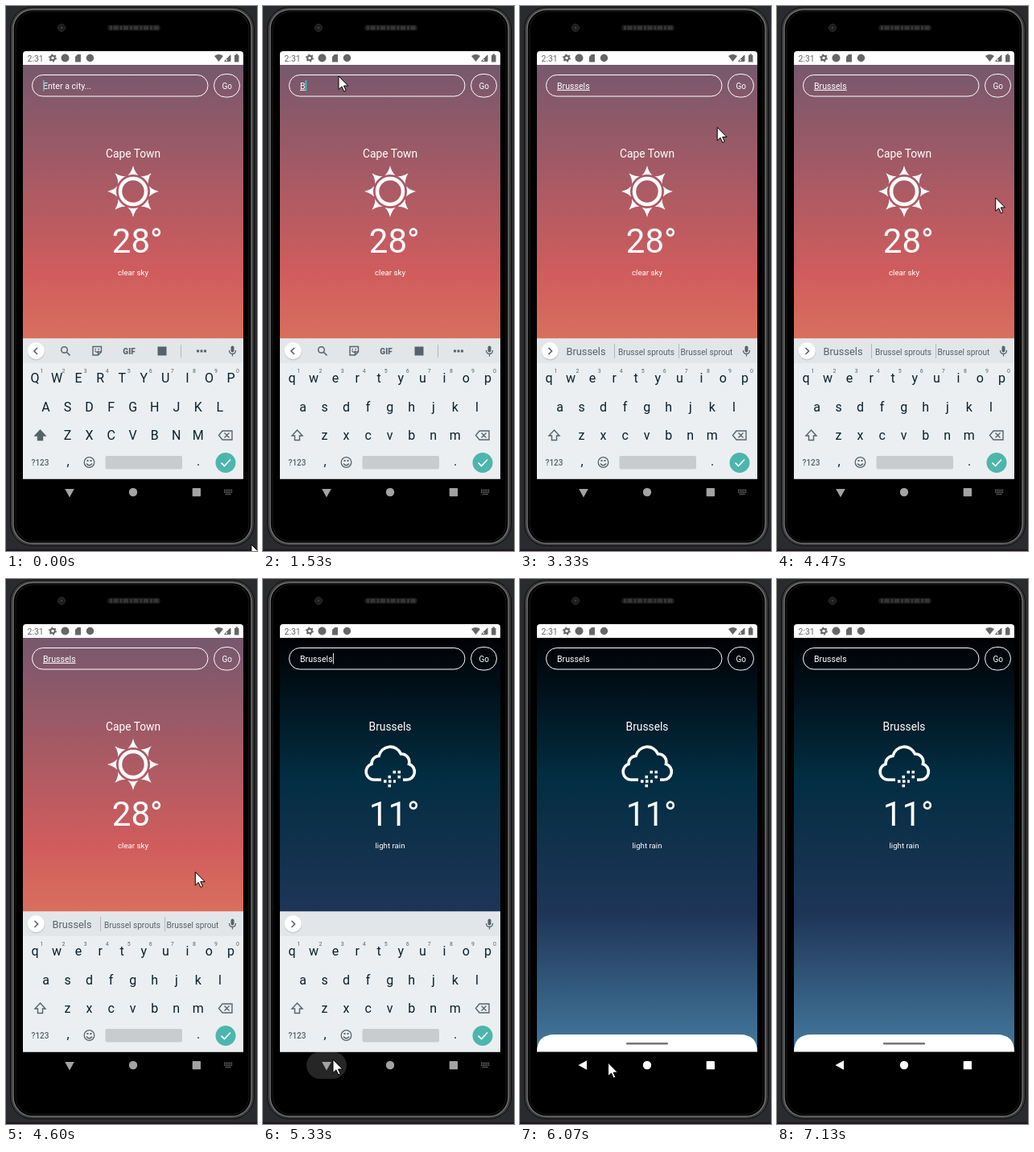
These frames come from a looping animation (312 by 676 pixels, 7190 ms). An HTML page:

```html
<!DOCTYPE html>
<html lang="en">
<head>
<meta charset="utf-8">
<title>Weather search</title>
<style>
  html, body { margin: 0; width: 100%; height: 100%; overflow: hidden; background: #292b2e; }
  svg { display: block; width: 100vw; height: 100vh; font-family: Roboto, sans-serif; }
  .mid { text-anchor: middle; }
  .line { fill: none; stroke: currentColor; }
  .keys { color: #56636b; fill: #08202f; font-size: 16px; }
  .icon { fill: #56636b; }
  .hint { font-size: 7px; fill: #56636b; }
  .word { fill: #56636b; font-size: 10.1px; }
</style>
</head>
<body>
<svg viewBox="0 0 312 676">
  <defs>
    <linearGradient id="warm" x2="0" y2="1">
      <stop stop-color="#76586d"/><stop offset=".5" stop-color="#d05c5d"/><stop offset="1" stop-color="#ea9760"/>
    </linearGradient>
    <linearGradient id="cold" x2="0" y2="1">
      <stop stop-color="#000003"/><stop offset=".333" stop-color="#022d41"/>
      <stop offset=".667" stop-color="#1f3558"/><stop offset="1" stop-color="#447a9e"/>
    </linearGradient>
    <clipPath id="nav"><rect x="21" y="586" width="274" height="35"/></clipPath>
  </defs>

  <!-- Phone body -->
  <rect width="312" height="676" fill="#292b2e"/>
  <rect y="674" width="312" height="2" fill="#20131f"/>
  <rect x="5.500" y="1.500" width="303" height="668" rx="27" fill="#3b3b3b" stroke="#0b0b0b"/>
  <rect x="9" y="4.500" width="296" height="662" rx="24" stroke="#6e6e6e" stroke-width="1.500"/>
  <rect x="12" y="7" width="290" height="657" rx="22" stroke="#1a1a1a"/>
  <circle cx="69" cy="27" r="4.500" fill="#1b1b1b" stroke="#303030"/>
  <circle cx="69" cy="27" r="1.500" fill="#3c3c3c"/>
  <rect x="126" y="23.500" width="66" height="7" rx="3.500" fill="#191919"/>
  <path d="M129 27H190" stroke="#343434" stroke-width="5" stroke-dasharray="3 1.5 6 2"/>

  <!-- Status bar -->
  <path d="M21 73V60Q21 56 25 56H291Q295 56 295 60V73Z" fill="#fff"/>
  <g fill="#666" color="#666">
    <text x="26.500" y="68.500" font-size="10.500">2:31</text>
    <circle class="line" cx="58" cy="64.500" r="2.800" stroke-width="2"/>
    <circle class="line" cx="58" cy="64.500" r="4.200" stroke-width="1.600" stroke-dasharray="1.800 2.600"/>
    <circle cx="73.500" cy="64.500" r="5"/>
    <path d="M86 63L89 60H93V69.500H86Z"/>
    <circle cx="104.500" cy="64.500" r="4.700"/>
    <path d="M259 62Q264.500 58 270 62L264.500 69Z"/>
    <path class="line" d="M271.500 68.500H279V61Z"/>
    <path d="M275 65L279 61V69H275Z"/>
    <path d="M284 61H285.500V59.500H288V61H289.500V69.500H284Z"/>
  </g>

  <!-- Weather screen -->
  <rect id="sky" x="21" y="73" width="274" height="514"/>
  <g fill="none" stroke="#fff">
    <rect x="32.500" y="85.500" width="218.500" height="26.500" rx="13.250"/>
    <rect x="258.500" y="84.500" width="32" height="28.500" rx="14.250"/>
  </g>
  <g fill="#fff">
    <text class="mid" x="274.700" y="102.500" font-size="10">Go</text>
    <text id="field" x="46" y="102.800" font-size="10.600"></text>
    <rect id="caret" y="92" height="13.500"/>
    <g class="mid">
      <text id="city" x="158" y="187.500" font-size="13.800"></text>
      <text id="degrees" x="163.300" y="306" font-size="42"></text>
      <text id="summary" x="158" y="334" font-size="9.700"></text>
    </g>
    <g id="sun" transform="translate(158 230)">
      <circle r="16" fill="none" stroke="#fff" stroke-width="4.500"/>
    </g>
    <g id="rain">
      <path d="M147 249H138.500A10 10 0 0 1 135 229.500A9.500 9.500 0 0 1 144 219.500A14.500 14.500 0 0 1 171.500 217A10 10 0 0 1 181.500 229.500A10 10 0 0 1 178.500 249H174" fill="none" stroke="#fff" stroke-width="3.600"/>
      <path d="M161.500 239.500H171M155.500 245.500H159M167.500 245.500H171M150 251H165M155.500 256.500H159" stroke="#fff" stroke-width="3.500" stroke-dasharray="3.500 2.500"/>
    </g>
  </g>
  <path d="M21 587Q21 565 43 565H273Q295 565 295 587Z" fill="#fff"/>
  <rect x="132" y="575" width="52" height="2.500" rx="1.200" fill="#777"/>

  <rect x="21" y="586.500" width="274" height="35"/>

  <!-- Keyboard -->
  <g id="keyboard" class="keys">
    <rect x="21" y="412.500" width="274" height="174" fill="#eceff1"/>
    <rect x="21" y="412.500" width="274" height="30.500" fill="#e3e6e8"/>
    <circle cx="37.500" cy="428.700" r="10.800" fill="#c5cacd"/>
    <circle cx="37.300" cy="427.700" r="10.500" fill="#fff"/>
    <path id="chevron" class="line" stroke-width="1.600"/>
    <g id="tools">
      <circle class="line" cx="72.500" cy="426.500" r="3.800" stroke-width="1.500"/>
      <path class="line" d="M75.500 429.500L79.500 433.500" stroke-width="1.700"/>
      <path class="line" d="M108 422.500H118.500V429L114.500 433H108ZM114.500 433V429H118.500M110.500 427.500Q112.500 431 115 428" stroke-width="1.400"/>
      <path class="icon" d="M110.500 425h1.500v1.500h-1.500zM114.500 425h1.500v1.500h-1.500z"/>
      <text class="mid icon" x="153" y="431.500" font-size="10" font-weight="800">GIF</text>
      <rect class="icon" x="188.500" y="422.500" width="11" height="11"/>
      <path class="line" d="M217.500 420V436" opacity=".35"/>
      <path class="icon" d="M237 426.500h3v3h-3zM241.500 426.500h3v3h-3zM246 426.500h3v3h-3z"/>
    </g>
    <g id="words" class="mid">
      <path class="line" d="M117.500 419V437M197.500 419V437" opacity=".35"/>
      <text class="word" x="82" y="433" style="font-size:12.800px"></text>
      <text class="word" x="157" y="432.500"></text>
      <text class="word" x="232" y="432.500"></text>
    </g>
    <rect class="icon" x="279.500" y="421.500" width="4" height="8" rx="2"/>
    <path class="line" d="M277.500 427Q277.500 431.500 281.500 431.500T285.500 427M281.500 431.500V434.500" stroke-width="1.300"/>
    <g id="letters" class="mid"></g>
    <path id="shift" class="line" d="M42.500 526L49 533H45.500V538.500H39.500V533H36Z" stroke-width="1.400"/>
    <path class="line" d="M264.500 532.500L269 527H281V538H269ZM271.500 529.500L277.500 535.500M277.500 529.500L271.500 535.500" stroke-width="1.400"/>
    <text class="mid icon" x="42.500" y="570" font-size="10" font-weight="500">?123</text>
    <text class="mid" x="77" y="570">,</text>
    <text class="mid" x="239" y="570">.</text>
    <circle class="line" cx="103.500" cy="566" r="6.300" stroke-width="1.300"/>
    <path class="line" d="M100 567.500Q103.500 572 107 567.500" stroke-width="1.300"/>
    <path class="icon" d="M100.500 563h2v2h-2zM104.500 563h2v2h-2z"/>
    <rect x="123.500" y="558" width="95.500" height="16.500" rx="2" fill="#c8ccce"/>
    <circle cx="273" cy="566.500" r="12.500" fill="#4db6ac"/>
    <path class="line" d="M267.500 566.500L271.500 570.500L279 562.500" style="stroke:#fff" stroke-width="1.700"/>
  </g>

  <!-- Navigation bar -->
  <g clip-path="url(#nav)"><rect id="ripple" y="586.500" height="33.500" rx="16.700" fill="#fff"/></g>
  <g id="navIcons">
    <path id="back" d="M-6.500 0L4 -5.800V5.800Z"/>
    <circle cx="158" cy="603" r="5.200"/>
    <rect x="231.700" y="598" width="10.300" height="10.300" rx=".8"/>
    <path id="switcher" d="M271 600.500H282M271 603H282M273 605.500H280" stroke="#858585" stroke-width="1.500" stroke-dasharray="1.300 .9"/>
  </g>

  <path id="mouse" d="M0 0V16.500L3.900 12.900L6.700 19L9.200 17.800L6.500 12H11.800Z" fill="#fff" stroke="#000"/>
</svg>
<script>
const LOOP = 7190;
const WEATHER_AT = 4670;
const KEYBOARD_EXIT = 5340;
const QUERY = 'Brussels';
const KEY_TIMES = [1530, 1670, 1800, 2000, 2130, 2330, 2470, 2600];
const WORDS = [
  ['B', 'But', 'Be'], ['Br', 'Bring', 'Bro'], ['Bru', 'Bruh', 'Bruce'],
  ['Brus', 'Brush', 'Brussels'], ['Bruss', 'Brussels', 'Brussel'], ['Brusse', 'Brussels', 'Brussel'],
  ['Brussel', 'Brussels', 'Brussel sprouts'], ['Brussels', 'Brussel sprouts', 'Brussel sprout']
];
// time, x, y
const MOUSE_PATH = [
  [0, 305, 668], [70, 303, 662], [270, 248, 510], [470, 136, 208], [670, 94, 87],
  [2980, 94, 87], [3140, 152, 96], [3330, 245, 150], [3470, 274, 212], [3670, 275, 102],
  [3800, 275, 102], [3930, 275, 105], [4310, 275, 105], [4470, 272, 237], [4670, 216, 430],
  [5000, 113, 597], [5130, 87, 596], [5400, 87, 596], [5470, 88, 593], [5970, 88, 597],
  [6330, 165, 608], [6670, 239, 633], [6720, 240, 635], [7100, 280, 680], [7189, 290, 690]
];
const CARET_ON = [[0, 70], [570, 1070], [1530, 3000], [3430, 3930], [5270, 5770], [6270, 6770]];

const $ = id => document.getElementById(id);
const set = (node, attrs) => { for (const key in attrs) node.setAttribute(key, attrs[key]); };
const show = (id, on) => { $(id).style.display = on ? '' : 'none'; };
const progress = (t, start, length) => Math.min(1, Math.max(0, (t - start) / length));

function add(parent, tag, attrs, text = '') {
  const node = document.createElementNS('http://www.w3.org/2000/svg', tag);
  set(node, attrs);
  node.textContent = text;
  return parent.appendChild(node);
}

for (let i = 0; i < 8; i++) {
  add($('sun'), 'path', { d: 'M-6.5 -20Q0 -22 6.5 -20Q2 -24 0 -32Q-2 -24 -6.5 -20Z', transform: `rotate(${i * 45})` });
}

const letters = [];
[['qwertyuiop', 36, 467], ['asdfghjkl', 49.5, 502.5], ['zxcvbnm', 76.5, 537.5]].forEach(([row, left, y], r) => {
  [...row].forEach((letter, i) => {
    const x = left + i * 27.05;
    letters.push([add($('letters'), 'text', { x, y }, letter), letter]);
    if (r === 0) add($('letters'), 'text', { x: x + 8.5, y: 455, class: 'hint' }, (i + 1) % 10);
  });
});

function mouseAt(t) {
  const next = Math.max(1, MOUSE_PATH.findIndex(point => point[0] > t));
  const [t0, x0, y0] = MOUSE_PATH[next - 1];
  const [t1, x1, y1] = MOUSE_PATH[next];
  const p = (t - t0) / (t1 - t0);
  return [x0 + (x1 - x0) * p, y0 + (y1 - y0) * p];
}

function drawWeather(t) {
  const cold = t >= WEATHER_AT;
  set($('sky'), { fill: `url(#${cold ? 'cold' : 'warm'})` });
  $('city').textContent = cold ? 'Brussels' : 'Cape Town';
  $('degrees').textContent = cold ? '11°' : '28°';
  $('summary').textContent = cold ? 'light rain' : 'clear sky';
  show('sun', !cold);
  show('rain', cold);
}

function drawField(t, typed) {
  const field = $('field');
  const composing = typed && t < WEATHER_AT;
  field.textContent = QUERY.slice(0, typed);
  const end = 46 + (typed ? field.getComputedTextLength() : 0);
  if (!typed) field.textContent = 'Enter a city...';
  field.style.textDecoration = composing ? 'underline' : 'none';
  set($('caret'), t < WEATHER_AT
    ? { x: end, width: 1.6, fill: '#20d0c5' }
    : { x: end + 0.3, width: 1, fill: '#d8eeee' });
  show('caret', CARET_ON.some(([on, off]) => t >= on && t < off));
}

function drawKeyboard(t, typed) {
  const suggesting = t >= 1600;
  for (const [node, letter] of letters) node.textContent = typed ? letter : letter.toUpperCase();
  set($('shift'), { style: typed ? '' : 'fill:#56636b' });
  set($('chevron'), { d: suggesting ? 'M35.500 424L39.500 428L35.500 432' : 'M39 424L35 428L39 432' });
  show('tools', !suggesting);
  show('words', suggesting && t < WEATHER_AT);
  if (typed) $('words').querySelectorAll('text').forEach((node, i) => { node.textContent = WORDS[typed - 1][i]; });

  const exit = progress(t, KEYBOARD_EXIT, 240);
  set($('keyboard'), { transform: `translate(0 ${64 * exit ** 2})`, opacity: 1 - exit ** 1.6 });
}

function drawNavigation(t) {
  const open = t < 5400;
  set($('navIcons'), { fill: open ? '#a3a3a3' : '#fff' });
  set($('back'), { transform: `translate(79 603) rotate(${-90 + 90 * progress(t, 5380, 135)})` });
  show('switcher', open);
  const half = 18 + 17 * progress(t, 5250, 200);
  const pressed = t >= 5270 && t < 5930;
  set($('ripple'), { x: 79 - half, width: half * 2, opacity: pressed ? 0.15 * (1 - progress(t, 5400, 500)) : 0 });
}

function draw() {
  const t = performance.now() % LOOP;
  const typed = KEY_TIMES.filter(time => time <= t).length;
  drawWeather(t);
  drawField(t, typed);
  drawKeyboard(t, typed);
  drawNavigation(t);
  set($('mouse'), { transform: `translate(${mouseAt(t)})` });
  requestAnimationFrame(draw);
}
draw();
</script>
</body>
</html>
```
